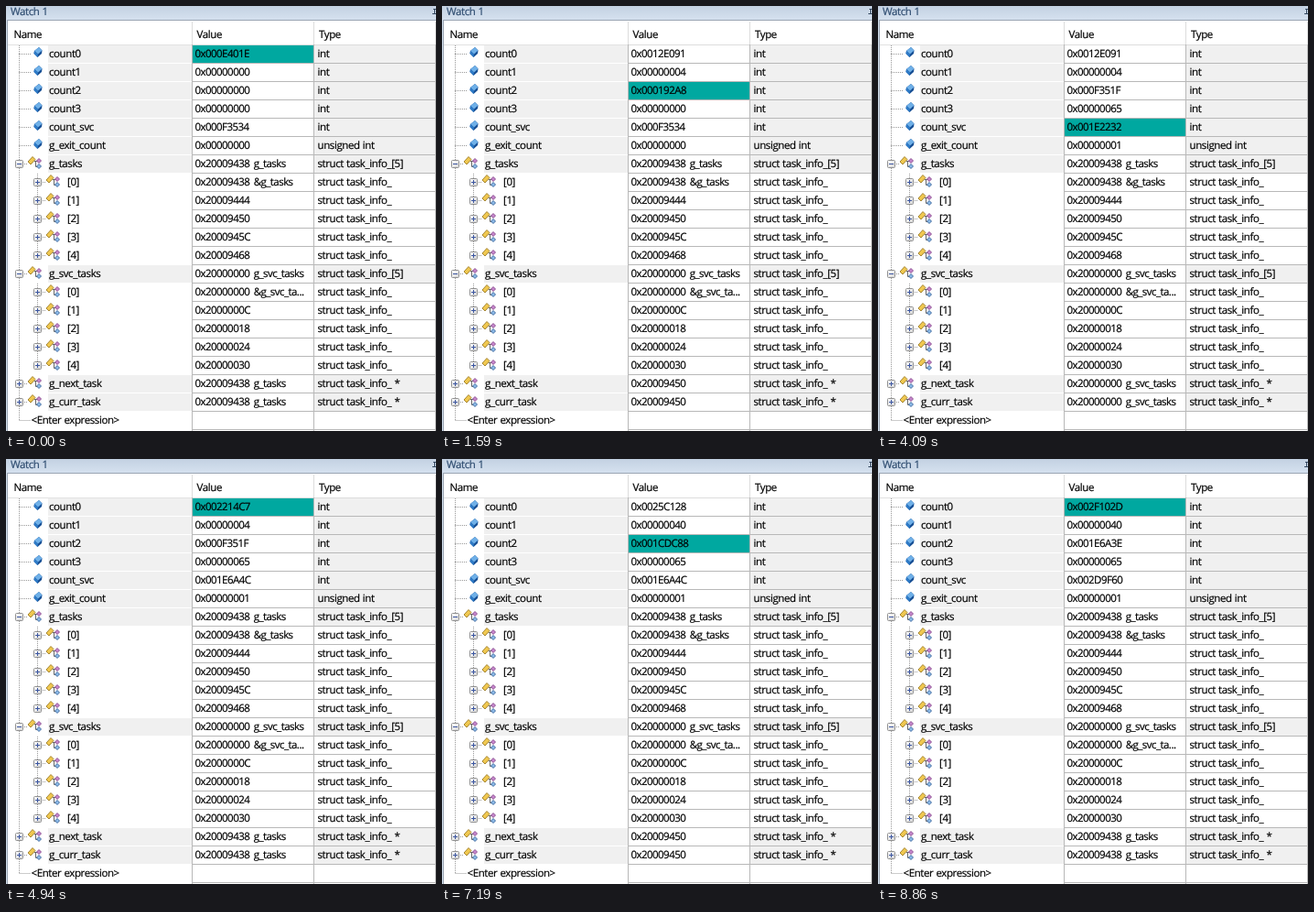
Animation of 470 by 464 pixels, one loop 8.96 s. Source, as an HTML page:

```html
<!DOCTYPE html>
<html lang="en">
<head>
<meta charset="utf-8">
<title>Watch window</title>
<style>
  html, body { margin: 0; width: 100%; height: 100%; overflow: hidden; background: #fff; }
  svg { display: block; }
  text {
    font: 11.5px "Open Sans", "Noto Sans", sans-serif;
    letter-spacing: -.4px;
    word-spacing: .6px;
    stroke-width: .2px;
    text-rendering: geometricPrecision;
    white-space: pre;
  }
  .value { letter-spacing: -.55px; word-spacing: 2px; }
</style>
</head>
<body>
<svg id="stage" width="470" height="464" viewBox="0 0 470 464">
  <defs>
    <linearGradient id="bar" x2="0" y2="1">
      <stop stop-color="#c3d1e2"/><stop offset="1" stop-color="#d5e1ef"/>
    </linearGradient>
    <linearGradient id="button" x2="1" y2="1">
      <stop stop-color="#fff"/><stop offset="1" stop-color="#d4d4d4"/>
    </linearGradient>
    <g id="variable">
      <path d="M1 -5.5 4.5 -2 4 1.5 -.5 5.5 -4.5 1.5 -4 -1.5Z" fill="#174f94"/>
      <path d="M1 -5.5 4.5 -2 0 2 -4 -1.5Z" fill="#6fb0e8"/>
      <path d="M-4 -1.5 0 2 -.5 5.5 -4.5 1.5Z" fill="#2f7cc8"/>
    </g>
    <g id="struct">
      <path d="M-1 -1.5H3M.5 -1.5V4.5H3" fill="none" stroke="#666"/>
      <path d="M-3 -6.5 0 -3.5 -5 2 -8 -1Z" fill="#f0c850" stroke="#9b7a24" stroke-width=".9"/>
      <path d="M4 -4.5 6.5 -2 4 .5 1.5 -2Z" fill="#c687cc" stroke="#84468b" stroke-width=".9"/>
      <path d="M4 1.5 6.5 4 4 6.5 1.5 4Z" fill="#8cbbe8" stroke="#345f98" stroke-width=".9"/>
    </g>
  </defs>
</svg>
<script>
const LOOP = 8960, ROW = 20, TOP = 43, GRID = '#b8b8b8';
const stage = document.getElementById('stage');

function add(tag, attrs, content) {
  const node = document.createElementNS('http://www.w3.org/2000/svg', tag);
  for (const key in attrs) node.setAttribute(key, attrs[key]);
  if (content !== undefined) node.textContent = content;
  stage.append(node);
  return node;
}
const rect = (x, y, width, height, fill) => add('rect', { x, y, width, height, fill });
const label = (x, y, content, fill = '#000') => add('text', { x, y, fill, stroke: fill }, content);
const dots = d => add('path', { d, stroke: '#999', 'stroke-dasharray': '1 1', fill: 'none' });
const icon = (name, x, y) => add('use', { href: '#' + name, x, y });
const hex = value => '0x' + value.toString(16).toUpperCase().padStart(8, '0');

// Watch rows: name, type, depth, toggle sign, fixed value
const rows = [];
['count0', 'count1', 'count2', 'count3', 'count_svc', 'g_exit_count'].forEach((name, i) =>
  rows.push({ name, type: i === 5 ? 'unsigned int' : 'int', depth: 0 }));
function addArray(name, base, alias) {
  rows.push({ name, type: 'struct task_info_[5]', depth: 0, sign: '-', value: `${hex(base)} ${name}` });
  for (let i = 0; i < 5; i++) {
    rows.push({ name: `[${i}]`, type: 'struct task_info_', depth: 1, sign: '+',
      value: hex(base + 12 * i) + (i ? '' : ' &' + alias) });
  }
}
addArray('g_tasks', 0x20009438, 'g_tasks');
addArray('g_svc_tasks', 0x20000000, 'g_svc_ta...');
for (const name of ['g_next_task', 'g_curr_task']) {
  rows.push({ name, type: 'struct task_info_ *', depth: 0, sign: '+' });
}

function drawToggle(x, y, sign) {
  add('rect', { x: x - 4, y: y - 4, width: 8, height: 8, rx: 1, fill: 'url(#button)', stroke: '#919191' });
  add('path', { d: `M${x - 2.5} ${y}h5` + (sign === '+' ? `M${x} ${y - 2.5}v5` : ''), stroke: '#3c56a0' });
}

function drawFrame() {
  rect(0, 0, 470, 464, '#fff');
  rect(0, 0, 470, 15, 'url(#bar)');
  rect(0, 15, 1, 449, '#d5e1ef');
  rect(1, 15, 469, 1, '#9aa5b3');
  rect(1, 15, 1, 449, '#9aa5b3');
  add('path', { d: 'M467 3.5h3M468.5 3v5M466 8.5h4', stroke: '#33475f', fill: 'none' });
  label(5, 10, 'Watch 1', '#2c4a6e');
  label(8.5, 35, 'Name');
  label(208.5, 35, 'Value');
  label(342, 35, 'Type');
}

function drawRow(row, i) {
  const y = TOP + i * ROW, mid = y + 9.5, shift = row.depth * 20;
  if (!row.depth) {
    rect(46, y, 157, 19, '#f0f0f0');
    rect(337, y, 133, 19, '#f0f0f0');
  }
  dots(`M${14 + shift} ${mid}H${(row.sign ? 24 : 28) + shift}`);
  if (row.sign) {
    drawToggle(14.5 + shift, mid, row.sign);
    icon('struct', 32 + shift, y + 8);
  } else {
    icon('variable', 35, y + 7.5);
  }
  label(47 + shift, y + 13, row.name);
  label(340.5, y + 13, row.type);
  row.mark = rect(204, y, 132, 19, '#00a8a0');
  row.mark.style.display = 'none';
  row.cell = label(206.5, y + 13, row.value || '');
  row.cell.classList.add('value');
}

function drawWindow() {
  drawFrame();
  dots('M14.5 43V452M14.5 452.5H27');
  for (const first of [7, 13]) dots(`M34.5 ${TOP + first * ROW}v90`);
  rows.forEach(drawRow);
  label(27.5, 456, '<Enter expression>');
  for (let i = 0; i <= rows.length + 1; i++) rect(204, 42 + i * ROW, 266, 1, i ? GRID : '#dcdcdc');
  rect(2, 42, 201, 1, '#e2e2e2');
  for (const x of [203, 336, 469]) {
    rect(x, 17, 1, 25, '#dcdcdc');
    rect(x, 42, 1, 422, GRID);
  }
}

// Refresh moments: [time, number of refreshes until the next entry]
const refreshes = [[0, 1], [250, 6], [1160, 1], [1310, 2], [1590, 1], [1740, 4], [2280, 1],
  [2410, 2], [2680, 1], [3090, 7], [4090, 1], [4210, 7], [5230, 1], [5380, 2], [5670, 1],
  [5800, 4], [6370, 1], [6490, 5], [7190, 1], [7340, 1], [7460, 1], [7610, 7], [8590, 1],
  [8740, 1], [8860, 1]];
const ticks = refreshes.flatMap(([start, n], i) => {
  const end = i + 1 < refreshes.length ? refreshes[i + 1][0] : LOOP;
  return Array.from({ length: n }, (_, k) => start + (end - start) * k / n);
});

// Counters advance only while their own task has the processor
const ramps = {
  0: [[0, 0xE401E], [252, 0x12E091], [4109, 0x12E091], [5139, 0x25C128], [8352, 0x25C128], [8860, 0x2F102D]],
  2: [[1484, 0], [1590, 0x192A8], [2514, 0xF351F], [6265, 0xF351F], [7190, 0x1CDC88], [7295, 0x1E6A3E]],
  4: [[3079, 0xF3534], [4090, 0x1E2232], [4109, 0x1E6A4C], [7295, 0x1E6A4C], [8325, 0x2D9F60]]
};
const schedule = [[0, 0], [252, 1], [1484, 2], [2514, 3], [3079, 'svc'], [4109, 0],
  [5139, 1], [6265, 2], [7295, 'svc'], [8325, 0]];

function interpolate(keys, t) {
  if (t <= keys[0][0]) return keys[0][1];
  for (let i = 1; i < keys.length; i++) {
    const [t0, v0] = keys[i - 1], [t1, v1] = keys[i];
    if (t <= t1) return Math.round(v0 + (v1 - v0) * (t - t0) / (t1 - t0));
  }
  return keys[keys.length - 1][1];
}

function slowCount(t) {
  const steps = start => Math.max(0, Math.min(4, Math.floor((t - start - 170) / 270) + 1));
  return steps(252) * 2 ** steps(5139);
}

function countersAt(t) {
  const done = t > 2514;
  return [interpolate(ramps[0], t), slowCount(t), interpolate(ramps[2], t),
    done ? 0x65 : 0, interpolate(ramps[4], t), done ? 1 : 0];
}

function taskAt(t) {
  const task = schedule.filter(([start]) => start <= t).pop()[1];
  if (task === 'svc') return hex(0x20000000) + ' g_svc_tasks';
  return hex(0x20009438 + 12 * task) + (task ? '' : ' g_tasks');
}

let shown = -1;
function render(time) {
  let index = ticks.length - 1;
  while (ticks[index] > time) index--;
  if (index === shown) return;
  shown = index;
  const now = countersAt(ticks[index]);
  const before = index ? countersAt(ticks[index - 1]) : [0, ...now.slice(1)];
  now.forEach((value, i) => {
    rows[i].cell.textContent = hex(value);
    rows[i].mark.style.display = value === before[i] ? 'none' : '';
  });
  rows.slice(-2).forEach(row => { row.cell.textContent = taskAt(ticks[index]); });
}

drawWindow();
const began = performance.now();
function loop() {
  render((performance.now() - began) % LOOP);
  requestAnimationFrame(loop);
}
loop();
</script>
</body>
</html>
```
